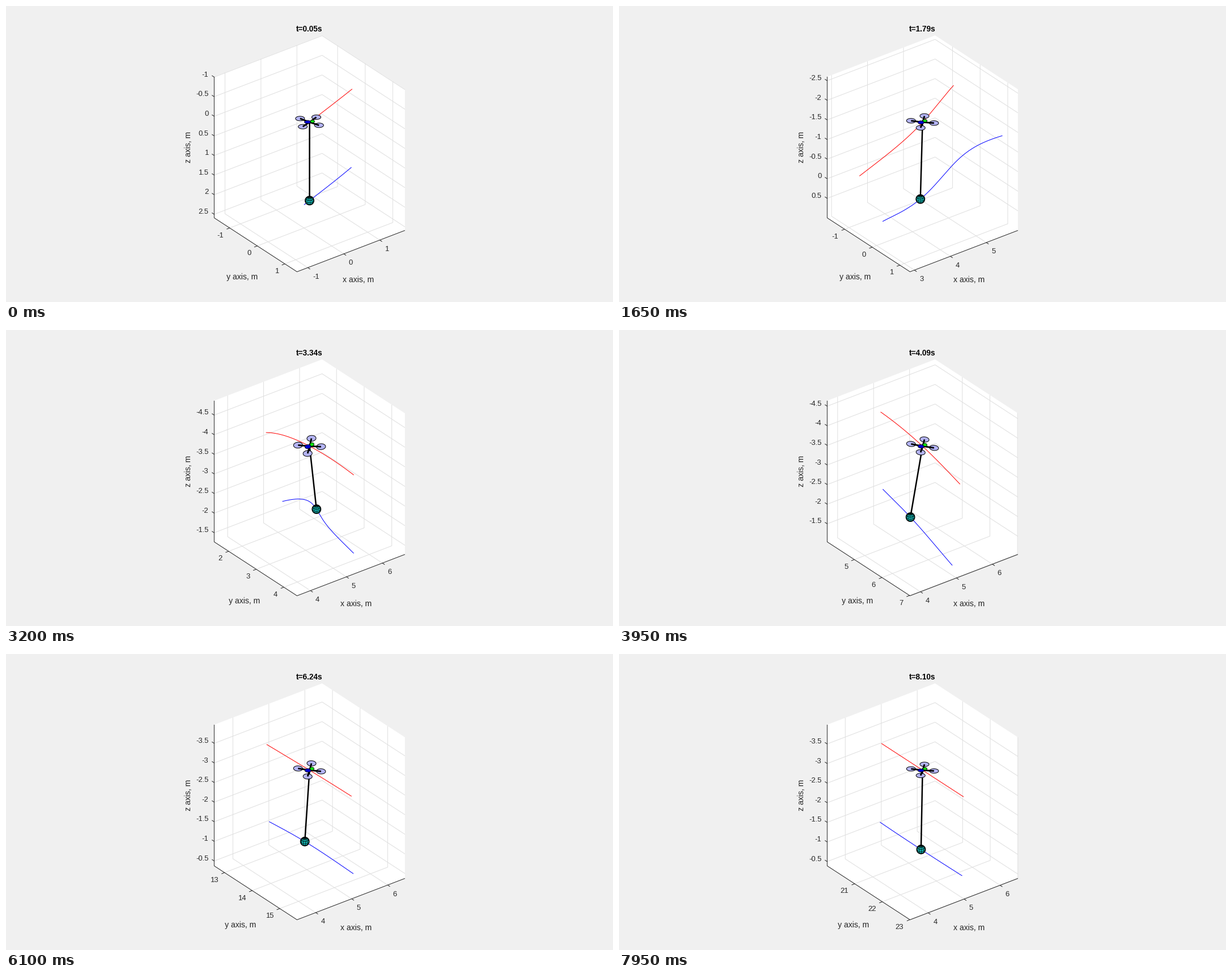
A matplotlib script that plays this animation: 1071x523 px, repeating every 8 s.

```python
import numpy as np
import matplotlib.pyplot as plt
from matplotlib.animation import FuncAnimation
from matplotlib.collections import LineCollection

W, H, DPI = 1071, 523, 64
PX = 72 / DPI                      # one pixel in points
FRAMES, INTERVAL = 160, 50
plt.rcParams["font.family"] = "Liberation Sans"

# View: 80 px per metre, azimuth 37.5 deg, elevation 30 deg, z pointing down
AZ, EL = np.radians(37.5), np.radians(30)
CA, SA, CE, SE = np.cos(AZ), np.sin(AZ), np.cos(EL), np.sin(EL)
PROJ = 80 * np.array([[CA, -SA * SE], [SA, CA * SE], [0, CE]])
VIEWER = np.array([-SA * CE, CA * CE, -SE])
CENTER = np.array([535.6, 205.3])
LOW = np.array([-1.5, -1.5, -1.0])
HIGH = np.array([1.5, 1.5, 2.6])

INK, GRID = "#262626", "#dfdfdf"
ANGLE = np.linspace(0, 2 * np.pi, 40)
CABLE, ARM = 2.0, 0.257            # metres

# Drone waypoints: time, x, y, z
WAYPOINTS = np.array([
    (0.00, 0.00, 0.00, 0.00), (0.40, 1.48, -0.42, -0.11),
    (1.00, 2.83, -0.48, -0.57), (1.75, 4.32, -0.16, -1.53),
    (2.59, 5.01, 0.93, -3.23), (3.30, 5.12, 2.85, -3.86),
    (4.09, 5.21, 5.51, -3.64), (4.99, 4.93, 9.05, -3.11),
    (6.24, 4.98, 14.11, -2.975), (7.40, 5.00, 18.73, -2.99),
    (8.60, 5.00, 23.52, -2.99)])

# Swings of the load along x and y: peak time, duration, reach
SWING_X = [(1.0, 0.32, 0.58), (3.1, 0.45, 0.60), (4.7, 0.5, -0.24),
           (6.24, 0.6, 0.085), (8.1, 0.8, -0.05)]
SWING_Y = [(1.2, 0.45, -0.45), (3.75, 0.65, -0.50), (5.15, 0.5, 0.32),
           (6.24, 0.5, -0.285), (7.4, 0.4, 0.2)]


def spline(knots, t):
    """Natural cubic spline through rows of (time, values...)."""
    kt, kv = knots[:, 0], knots[:, 1:]
    a = 1 / np.diff(kt)
    rise = np.diff(kv, axis=0) * a[:, None] ** 2
    none = np.zeros((1, kv.shape[1]))
    matrix = (np.diag(2 * (np.r_[a, 0] + np.r_[0, a]))
              + np.diag(a, 1) + np.diag(a, -1))
    slope = np.linalg.solve(matrix, 3 * (np.vstack([rise, none])
                                         + np.vstack([none, rise])))
    i = np.clip(np.searchsorted(kt, t, side="right") - 1, 0, len(a) - 1)
    h = 1 / a[i][:, None]
    u = (t - kt[i])[:, None] / h
    return ((1 + 2 * u) * (1 - u) ** 2 * kv[i] + u * (1 - u) ** 2 * h * slope[i]
            + u * u * (3 - 2 * u) * kv[i + 1] + u * u * (u - 1) * h * slope[i + 1])


def pulses(swings, t):
    return sum(reach * np.exp(-((t - peak) / span) ** 2)
               for peak, span, reach in swings)


def cable(t):
    """Vector from drone to load; its length never changes."""
    sx, sy = pulses(SWING_X, t), pulses(SWING_Y, t)
    return np.column_stack([sx, sy, np.sqrt(CABLE ** 2 - sx ** 2 - sy ** 2)])


def clock(i):
    """Simulated time: it gains a little at first, then hardly at all."""
    return 0.05 * (i + 1) + min(0.0028 * i, 0.0875 + 0.00005 * i)


TIMES = np.linspace(0, 8.6, 2000)
DRONE_PATH = spline(WAYPOINTS, TIMES)
LOAD_PATH = DRONE_PATH + cable(TIMES)


def project(rel):
    return CENTER + np.asarray(rel, float) @ PROJ


def sphere_mesh(radius):
    """Visible parts of the circles of a wire sphere, on screen."""
    c, s = np.cos(ANGLE), np.sin(ANGLE)
    rings = [np.column_stack([np.cos(lat) * c, np.cos(lat) * s,
                              np.full_like(c, np.sin(lat))])
             for lat in np.radians(np.arange(-60, 61, 30))]
    rings += [np.column_stack([c * np.cos(lon), c * np.sin(lon), s])
              for lon in np.radians(np.arange(0, 180, 30))]
    out = []
    for ring in rings:
        flat = ring @ PROJ / 80 * radius
        flat[ring @ VIEWER < -0.05] = np.nan
        out.append(flat)
    return out


MESH = sphere_mesh(7.5)

fig = plt.figure(figsize=(W / DPI, H / DPI), dpi=DPI, facecolor="#f0f0f0")
ax = fig.add_axes([0, 0, 1, 1])


def line(pts, color, width=1.0, z=3):
    pts = np.asarray(pts)
    ax.plot(pts[:, 0], pts[:, 1], color=color, lw=width * PX, zorder=z,
            solid_capstyle="butt")


def segments(lines, color, z):
    ax.add_collection(LineCollection([project(p) for p in lines], colors=color,
                                     linewidths=PX, zorder=z))


def shape(pts, face, edge="black", width=1.0, z=5):
    ax.fill(pts[:, 0], pts[:, 1], facecolor=face, edgecolor=edge,
            lw=width * PX, zorder=z)


def text(x, y, s, size=13.0, ha="center", color=INK, **kw):
    ax.text(x, y, s, fontsize=size * PX, ha=ha, va="center", color=color, **kw)


def ticks(mid, axis, step):
    """Labels of the ticks in view and their offsets from the drone."""
    first = np.ceil((mid + LOW[axis]) / step)
    last = np.floor((mid + HIGH[axis]) / step)
    return [(f"{v + 0.0:g}", v - mid) for v in np.arange(first, last + 1) * step]


def label_width(marks):
    return max(sum(4.3 if c == "-" else 7.2 for c in s) for s, _ in marks)


def draw_axes(pos):
    (x0, y0, z0), (x1, y1, z1) = LOW, HIGH
    walls = [(x0, y0, z0), (x1, y0, z0), (x1, y1, z0),
             (x1, y1, z1), (x0, y1, z1), (x0, y0, z1)]
    shape(project(walls), "white", "none", 0, z=0)

    xs, ys, zs = (ticks(pos[k], k, s) for k, s in enumerate((1, 1, 0.5)))
    segments([[(v, y0, z0), (v, y0, z1), (v, y1, z1)] for _, v in xs]
             + [[(x1, v, z0), (x1, v, z1), (x0, v, z1)] for _, v in ys]
             + [[(x0, y0, v), (x1, y0, v), (x1, y1, v)] for _, v in zs], GRID, 1)

    size = 0.085
    segments([[(x0, y0, z0), (x0, y0, z1), (x0, y1, z1), (x1, y1, z1)]]
             + [[(v, y1, z1), (v, y1 + size, z1)] for _, v in xs]
             + [[(x0, v, z1), (x0 - size, v, z1)] for _, v in ys]
             + [[(x0, y0, v), (x0, y0 - size, v)] for _, v in zs], INK, 2)

    for s, v in xs:
        text(*(project((v, y1, z1)) + (9, 16.5)), s, ha="left")
    for s, v in ys:
        text(*(project((x0, v, z1)) + (-11, 13.5)), s, ha="right")
    for s, v in zs:
        text(*(project((x0, y0, v)) + (-10, -4)), s, ha="right")

    text(611 + 0.9 * label_width(xs), 484, "x axis, m", 14)
    text(427 - 0.9 * label_width(ys), 478.5, "y axis, m", 14)
    text(321.5, 249.5, "z axis, m", 14, rotation=90)


def draw_trail(path, pos, color):
    rel = path - pos
    pts = project(rel)
    pts[~np.all((rel >= LOW) & (rel <= HIGH), axis=1)] = np.nan
    line(pts, color)


def draw_load(spot):
    line([CENTER, spot], "black", 2.5, z=4)
    disc = spot + 7.8 * np.column_stack([np.cos(ANGLE), np.sin(ANGLE)])
    shape(disc, "#14cac6", width=1.2)
    for ring in MESH:
        line(ring + spot, "black", 0.8, z=6)


def arm(heading, swing):
    """One arm on screen; the body leans against the load's swing."""
    flat = ARM * np.array([np.cos(heading), np.sin(heading)])
    return np.append(flat, -0.32 * flat @ swing[:2]) @ PROJ


def draw_drone(t, swing):
    heading = np.radians(47 + 26 * np.exp(-5 * (t - 0.05)))
    p, q = arm(heading, swing), arm(heading - np.pi / 2, swing)
    disc = np.outer(np.cos(ANGLE), p) + np.outer(np.sin(ANGLE), q)
    tips = [CENTER - (0, 0.5) + a for a in (p, -p, q, -q)]
    for tip in tips:
        shape(tip + 0.39 * disc, "#b4b4f5", z=7)
        line([CENTER, tip], "black", 2.8, z=8)
    nose = p + q
    shape(CENTER - 0.12 * nose + (0, -0.6) + 0.27 * disc, "#0000d0", width=0.8, z=9)
    shape(CENTER + 0.18 * nose + (0, -1) + 0.18 * disc * (1, 1.3), "#10e010",
          width=0.8, z=10)


def draw(i):
    ax.clear()
    ax.set_xlim(0, W)
    ax.set_ylim(H, 0)
    ax.set_axis_off()
    t = clock(i)
    now = np.array([t])
    pos, swing = spline(WAYPOINTS, now)[0], cable(now)[0]
    draw_axes(pos)
    text(535.3, 41, f"t={t:.2f}s", 13.6, color="black", weight="bold")
    draw_trail(DRONE_PATH, pos, "red")
    draw_trail(LOAD_PATH, pos, "blue")
    draw_load(project(swing))
    draw_drone(t, swing)
    return []


anim = FuncAnimation(fig, draw, frames=FRAMES, interval=INTERVAL,
                     init_func=lambda: [], repeat=True, repeat_delay=0)
plt.show()
```
